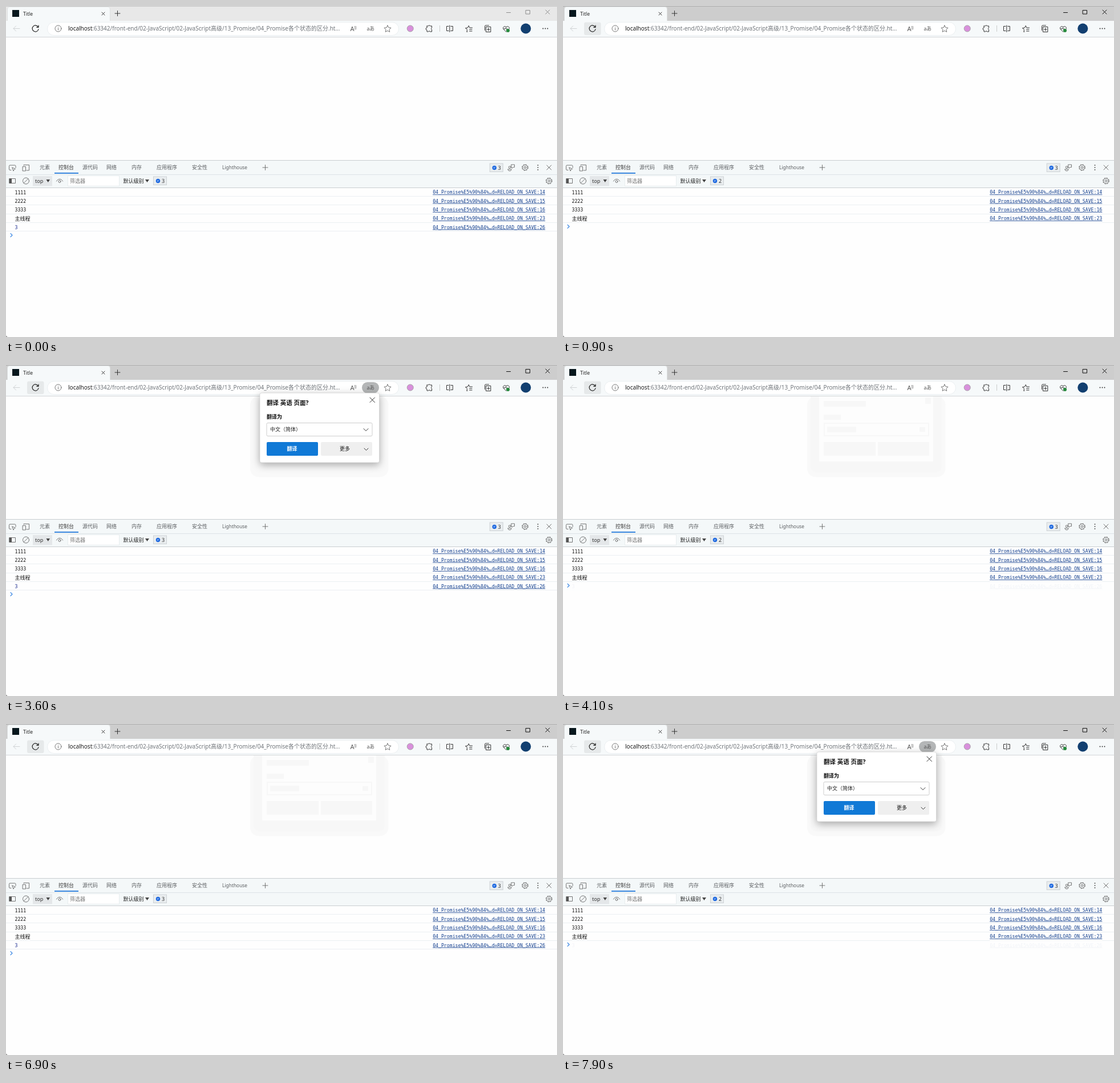
These frames come from a looping animation (966 px wide and 580 px high, 8000 ms). An HTML page:

```html
<!DOCTYPE html>
<html lang="zh-CN">
<head>
<meta charset="utf-8">
<title>Promise console</title>
<style>
html, body { margin: 0; width: 100%; height: 100%; overflow: hidden; background: #fefefe; }
svg { display: block; width: 966px; height: 580px; }
text { font: 9px "Noto Sans", "Noto Sans CJK SC", sans-serif; fill: #555; white-space: pre; }
.mono text { font: 8.2px "DejaVu Sans Mono", "Noto Sans CJK SC", monospace; fill: #111; }
.mono .cjk { font-size: 9px; }
.mono .link {
  fill: #15418f; text-anchor: end;
  text-decoration: underline; text-decoration-skip-ink: none; text-underline-offset: 1px;
}
.mono .num { fill: #1a2a8f; }
.icon { fill: none; stroke: #333; stroke-width: 1; stroke-linecap: round; stroke-linejoin: round; }
.thin { stroke: #666; stroke-width: .9; }
.mid { text-anchor: middle; }
.bold { font-weight: 700; fill: #111; }
</style>
</head>
<body>
<svg viewBox="0 0 966 580">
  <rect width="966" height="580" fill="#fefefe"/>

  <!-- title bar -->
  <rect id="bar" width="966" height="27"/>
  <path d="M0 .5H966" stroke="#000" stroke-opacity=".15"/>
  <path d="M0 26H2V6Q2 1 7 1H178Q183 1 183 6V26H966V54H0z" fill="#f6f9fa"/>
  <path d="M2.500 26V6Q2.500 1.500 7 1.500H178Q182.500 1.500 182.500 6V26" fill="none" stroke="#000" stroke-opacity=".1"/>
  <path d="M0 54.500H966" stroke="#d3d6d8"/>
  <rect x="11" y="7" width="12" height="12" fill="#07171d"/>
  <text x="30" y="16.500" style="font-size:8.600px;fill:#222">Title</text>
  <path class="icon" d="M168 11l5 5m0-5l-5 5M191 13h9m-4.500-4.500v9"/>
  <path id="controls" class="icon" d="M877.500 11.500h7M911.500 7.500h7v6.500h-7zM946 7l7 7m0-7l-7 7"/>

  <!-- address bar -->
  <rect id="hover" x="37" y="28.500" width="29.500" height="22.500" rx="3"/>
  <path class="icon" d="M24 39.500H13l4.500-4.500M13 39.500l4.500 4.500" style="stroke:#d0d3d5"/>
  <path class="icon" style="stroke:#222;stroke-width:1.200" d="M56.500 37A5.500 5.500 0 1 0 57 40.500M57 34v3.300h-3.300"/>
  <rect x="72.500" y="28.500" width="616" height="23" rx="11.500" fill="#fff" stroke="#ebeff1"/>
  <g class="icon thin">
    <circle cx="91.500" cy="39.500" r="5.500"/>
    <path d="M91.500 39v3M91.500 37v.1"/>
  </g>
  <text x="109" y="43.300" style="font-size:10px;fill:#70757a"><tspan fill="#1c1c1c">localhost</tspan>:63342/front-end/02-JavaScript/02-JavaScript高级/13_Promise/04_Promise各个状态的区分.ht...</text>
  <text x="603.500" y="43.500" style="font-size:11px">A<tspan dy="-3.500" style="font-size:6.500px">))</tspan></text>
  <rect id="pill" x="624" y="30" width="30" height="19.500" rx="9.700" fill="#b4b6b7"/>
  <text class="mid" x="639.300" y="43" style="font-size:8.800px">aあ</text>
  <path class="icon thin" d="M669 34l1.800 3.700 4.200.6-3 3 .7 4.100-3.700-2-3.700 2 .7-4.100-3-3 4.200-.6z"/>
  <circle cx="708.700" cy="39.500" r="5.500" fill="#d990dc" stroke="#a5a0a6"/>
  <path d="M760.500 34v11" stroke="#ccc"/>
  <g class="icon">
    <path d="M738 35h2.500a1.600 1.600 0 0 1 3 0h3v3.300a1.600 1.600 0 0 0 0 3V45h-3a1.600 1.600 0 0 0-3 0H738v-3a1.800 1.800 0 0 1 0-4z"/>
    <path d="M777.800 34v11.500M776 35.500h-3.500v8h3.500M779.800 35.500h3.500v8h-3.500"/>
    <path d="M809 45l-1.200.4.700-4-3-2.700 4-.6 1.700-3.600 1.700 3.600h4.600M812.500 41h4.500M812.500 44h4.500"/>
    <path d="M839.500 42.500v-7q0-1.500 1.500-1.500h5.500M841.800 36.500h8v9h-8zM845.800 38.700v4.600M843.500 41h4.600"/>
    <path d="M877 45.500l-5-5c-2-3 2-6.500 5-3.500 3-3 7 .5 5 3.500M872.500 40h2.500l1.500-2 2 4 1-2"/>
  </g>
  <circle cx="880" cy="43" r="3" fill="#258a3c"/>
  <circle cx="911.300" cy="39.500" r="9" fill="#123f70"/>
  <g fill="#222"><circle cx="941.500" cy="39.500" r=".9"/><circle cx="945.500" cy="39.500" r=".9"/><circle cx="949.500" cy="39.500" r=".9"/></g>

  <!-- traces left by the popup -->
  <rect id="halo" x="428" y="55" width="242.500" height="141.500" rx="15" fill="#f9f9f9"/>
  <g id="trace" fill="#f7f7f7">
    <path d="M434 55H664V176Q664 188 652 188H446Q434 188 434 176z"/>
    <path fill="#fdfdfd" d="M449 55H649V169H449z"/>
    <path d="M457 63h74v10h-74zM457 87h30v9h-30zM463 108h51v10h-51zM625 109h10v8h-10zM635 57h10v11h-10zM457 135h91v24h-91zM552 135h90v24h-90z"/>
    <path d="M458 102H641V124H458z" fill="none" stroke="#f7f7f7" stroke-width="2"/>
  </g>

  <!-- translation popup -->
  <g id="popup">
    <rect x="445" y="49" width="209.500" height="122" rx="3" fill="#fff" stroke="#c9c9c9" stroke-width=".6" style="filter:drop-shadow(0 4px 7px rgba(0,0,0,.32))"/>
    <text class="bold" x="457" y="70" style="font-size:10.500px">翻译 英语 页面?</text>
    <text class="bold" x="457" y="94">翻译为</text>
    <rect x="457" y="101.500" width="185" height="23" rx="2" fill="#fff" stroke="#cdcdcd"/>
    <text x="463" y="116" style="fill:#222">中文（简体）</text>
    <rect x="457" y="135" width="90" height="24" rx="2" fill="#1079d6"/>
    <rect x="552" y="135" width="90" height="24" rx="2" fill="#efefef"/>
    <text class="mid bold" x="501.500" y="150.300" style="fill:#fff">翻译</text>
    <text class="mid bold" x="594" y="150.300" style="font-weight:500">更多</text>
    <path class="icon" d="M627 111.500l4 4 4-4M628 146l3.500 3.500 3.500-3.500M638 57l8.500 8.500m0-8.500l-8.500 8.500"/>
  </g>

  <!-- developer tools -->
  <rect y="270" width="966" height="48" fill="#f4f8f9"/>
  <path d="M0 270.500H966M0 318.500H966" stroke="#c9ced1"/>
  <path d="M0 295.500H966" stroke="#dde3e6"/>
  <g id="tabs"></g>
  <rect x="85" y="292" width="42" height="1.700" fill="#1a73d9"/>
  <g class="icon thin">
    <path d="M9 287.500H7q-1.500 0-1.500-1.500v-5.500q0-1.500 1.500-1.500h8.500q1.500 0 1.500 1.500v3M11 283l5.500 2.500-2.300 1-1 2.300z"/>
    <path d="M31 279.500v-1h9.500v9.500H36M29.500 281.500h5v7.500h-5z"/>
    <path d="M450 283h9M454.500 278.500v9"/>
    <path d="M886 278h5.500v4.500h-2.500l-2 2v-2h-1z"/>
    <circle cx="883" cy="282.500" r="1.800"/>
    <path d="M880 286h6v1q-.5 2-3 2t-3-2z"/>
    <path d="M948 279l8 8m0-8l-8 8"/>
    <path d="M6 302.500h10.500v8H6z"/>
    <circle cx="35" cy="306.500" r="5.500"/><path d="M31 310.500l8-8"/>
    <path d="M88.500 307c2.500-5 8.500-5 11 0"/><circle cx="94" cy="307.500" r="2"/>
    <g id="gear"><circle cx="910" cy="283" r="4.500"/><circle cx="910" cy="283" r="1.800"/><circle cx="910" cy="283" r="5.400" stroke-linecap="butt" stroke-dasharray="2.400 1.840"/></g>
    <use href="#gear" x="42" y="23.500"/>
  </g>
  <path d="M6 302.500h4v8H6z" fill="#555"/>
  <g fill="#555"><circle cx="932.500" cy="279" r="1"/><circle cx="932.500" cy="283" r="1"/><circle cx="932.500" cy="287" r="1"/></g>
  <rect x="47" y="298" width="34" height="17.500" fill="#e4e7e9"/>
  <text x="51" y="310" style="fill:#333">top</text>
  <path d="M70.500 304h6.500l-3.250 5zM244 304h7l-3.500 5z" fill="#444"/>
  <rect x="108.500" y="297.500" width="90" height="18" fill="#fff" stroke="#e8edef"/>
  <text x="112" y="310" style="fill:#777">筛选器</text>
  <text x="205.500" y="310" style="fill:#222">默认级别</text>
  <g id="badge">
    <rect x="258.500" y="299" width="23" height="14.500" fill="#e9edef" stroke="#cdd2d5"/>
    <circle cx="266.500" cy="306.500" r="3.700" fill="#1a66e0"/>
    <path d="M264.800 305.800h3.400M264.800 307.300h2.400" stroke="#fff" stroke-width=".6"/>
  </g>
  <use href="#badge" x="589.700" y="-23"/>
  <text id="toolCount" class="mid" x="275.500" y="309.800" style="fill:#333"></text>
  <text id="tabCount" class="mid" x="865" y="286.500" style="fill:#333"></text>

  <!-- console -->
  <g id="rows" class="mono"></g>
  <path id="prompt" class="icon" d="M8 398.700l3 3-3 3" style="stroke:#2a7de1;stroke-width:1.200"/>
  <path d="M0 576Q0 580 4 580H0z" fill="#777"/>
</svg>
<script>
const $ = id => document.getElementById(id);
const LOOP = 8000, RELOADS = [700, 4000, 7600], ROW = 15.3;

const tabs = { 元素: 59, 控制台: 92, 源代码: 134, 网络: 176, 内存: 220, 应用程序: 264, 安全性: 326, Lighthouse: 379 };
$('tabs').innerHTML = Object.entries(tabs).map(([name, x]) =>
  `<text x="${x}" y="286.3" style="font-size:${name === 'Lighthouse' ? 8.4 : 9}px;fill:${x === 92 ? '#3c3c3c' : '#5c5f62'}">${name}</text>`).join('');

const logs = [['1111', 14], ['2222', 15], ['3333', 16], ['主线程', 23, 'cjk'], ['3', 26, 'num']];
$('rows').innerHTML = logs.map(([msg, line, cls = ''], i) => {
  const y = 329.6 + i * ROW;
  return `<g><text class="${cls}" x="15.5" y="${y}">${msg}</text>
    <text class="link" x="945.3" y="${y - .3}">04_Promise%E5%90%84%…d=RELOAD_ON_SAVE:${line}</text>
    <path d="M0 ${Math.floor(y + 3.9) + .5}H966" stroke="#ebeff2"/></g>`;
}).join('');
const lastRow = $('rows').lastElementChild;

const within = (t, a, b) => t >= a && t < b;

function popupOpacity(t) {
  if (within(t, 1000, 1100) || within(t, 4000, 4100) || within(t, 7800, 7900)) return .5;
  return within(t, 1100, 4000) || t >= 7900 ? 1 : 0;
}

function draw(t) {
  const focused = t >= 600;
  const start = RELOADS.filter(r => r <= t).pop() ?? -LOOP;
  const age = t - start;
  const pressed = within(age, 0, 100) || within(t, 7400, 7600);
  const cleared = within(t, 800, 3600) || within(t, 4100, 6900) || t >= 7700;

  $('bar').setAttribute('fill', focused ? '#cdcdcd' : '#e8e8e8');
  $('controls').style.stroke = focused ? '#111' : '#8c8c8c';
  $('hover').setAttribute('fill', !focused ? 'none' : pressed ? '#d6d8d9' : '#e6e9ea');
  $('popup').style.opacity = $('pill').style.opacity = popupOpacity(t);
  $('halo').style.opacity = +(t >= 1000);
  $('trace').style.opacity = +(t >= 4100);
  lastRow.style.opacity = !cleared ? 1 : t >= 4100 ? .05 : 0;
  $('prompt').setAttribute('transform', `translate(0 ${cleared ? -ROW : 0})`);
  $('toolCount').textContent = within(age, 100, 400) ? 2 : 3;
  $('tabCount').textContent = within(age, 400, 500) ? 2 : 3;
}

const begin = performance.now();
function tick() {
  draw((performance.now() - begin) % LOOP);
  requestAnimationFrame(tick);
}
tick();
</script>
</body>
</html>
```
